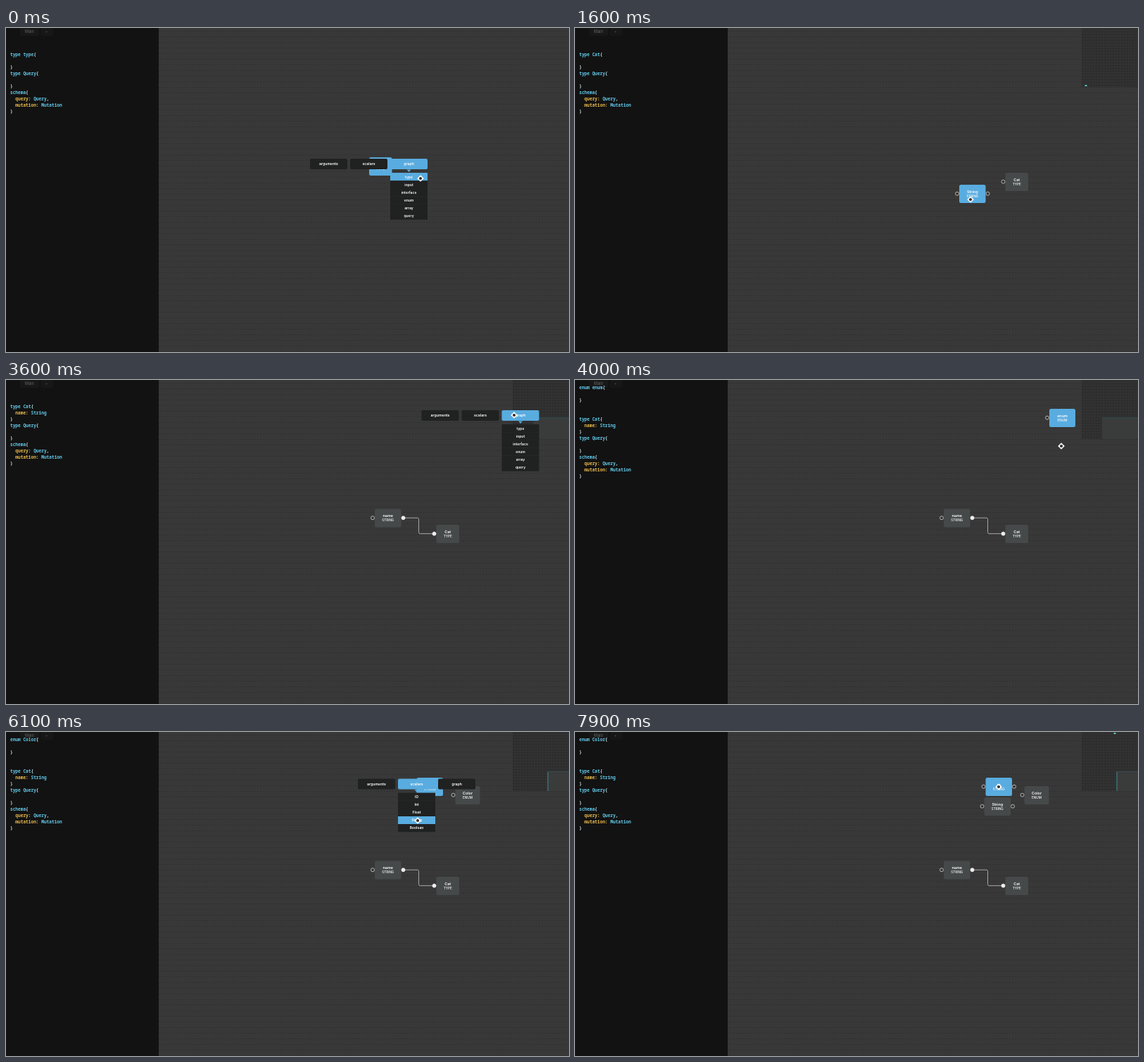
Recreate the animation shown at these times as an HTML page with a canvas. Size 800 by 461 pixels, loop 8 s.

```html
<!DOCTYPE html>
<html>
<head>
<meta charset="utf-8">
<style>
  html, body { margin: 0; width: 100%; height: 100%; overflow: hidden; background: #373737; }
  canvas { display: block; width: 800px; height: 461px; }
</style>
</head>
<body>
<canvas id="stage" width="800" height="461"></canvas>
<script>
const ctx = document.getElementById('stage').getContext('2d');
const LOOP = 8000, STEP = 100;
const BLUE = '#59acdf', CYAN = '#63c8e9', YELLOW = '#e9b94e', PALE = '#c8dde4', WHITE = '#fff';
const SANS = 'Inter, "Liberation Sans", sans-serif';
const MONO = '"Noto Sans Mono", "DejaVu Sans Mono", monospace';

// Each key is [time, x, y].
const CURSOR = [
  [100, 589, 214], [200, 535, 198], [300, 535, 198], [600, 630, 220], [900, 630, 220],
  [1000, 546, 223], [1200, 546, 234], [1400, 550, 285], [1600, 562, 244], [2200, 562, 244],
  [2300, 586, 236], [2600, 608, 218], [2700, 567, 241], [3000, 550, 218], [3200, 545, 201],
  [3500, 674, 41], [3600, 722, 50], [3800, 715, 102], [4000, 691, 94], [4200, 693, 60],
  [4600, 657, 95], [5400, 657, 95], [5500, 583, 64], [5600, 583, 64], [5700, 583, 76],
  [5900, 585, 126], [6300, 585, 126], [6500, 603, 81], [6600, 603, 81], [7000, 601, 109], [7200, 602, 78]
];
const CAT_PATH = [[300, 516, 184], [600, 611.5, 206]];
const NAME_PATH = [[2700, 546, 223], [3000, 529, 200.5], [3200, 524, 183.5]];
const COLOR_PATH = [[4200, 674, 41], [4600, 638.5, 77]];
const STRING_PATH = [[6600, 583.5, 65], [7000, 581.5, 93]];

const MENUS = [
  { from: 0, to: 200, x: 515.5, y: 193.5, tab: 2, opens: 0, item: 0, picks: 0 },
  { from: 1000, to: 1500, x: 546, y: 233, tab: 1, opens: 1200, item: 3, picks: 1400 },
  { from: 3500, to: 3900, x: 674, y: 50.5, tab: 2, opens: 3600, item: 3, picks: 3800 },
  { from: 5500, to: 6300, x: 583.5, y: 74, tab: 1, opens: 5700, item: 3, picks: 5900 }
];
const TABS = ['arguments', 'scalars', 'graph'];
const ITEMS = {
  1: ['ID', 'Int', 'Float', 'String', 'Boolean'],
  2: ['type', 'input', 'interface', 'enum', 'array', 'query']
};

const between = (t, a, b) => t >= a && t < b;

function along(keys, t) {
  const next = keys.findIndex(key => key[0] > t);
  if (next === 0) return keys[0].slice(1);
  if (next < 0) return keys[keys.length - 1].slice(1);
  const [t0, x0, y0] = keys[next - 1], [t1, x1, y1] = keys[next];
  const k = (t - t0) / (t1 - t0);
  return [x0 + (x1 - x0) * k, y0 + (y1 - y0) * k];
}

// Replaces `before` with `after`, one letter per step.
const typed = (t, start, before, after) =>
  t < start ? before : after.slice(0, Math.floor((t - start) / STEP) + 1);

function box(x, y, w, h, r, color) {
  ctx.fillStyle = color;
  ctx.beginPath();
  ctx.roundRect(x, y, w, h, r);
  ctx.fill();
}

function label(text, x, y, size, weight = 600, color = WHITE) {
  ctx.font = `${weight} ${size}px ${SANS}`;
  ctx.textAlign = 'center';
  ctx.fillStyle = color;
  ctx.fillText(text, x, y);
}

function port(x, y, linked) {
  ctx.beginPath();
  ctx.arc(x, y, 2.5, 0, 7);
  ctx.fillStyle = linked ? '#eee' : '#333';
  ctx.fill();
  ctx.strokeStyle = linked ? '#eee' : '#c4c4c4';
  ctx.lineWidth = 0.9;
  ctx.stroke();
}

function node([x, y], w, name, kind, { selected, output, linkIn, linkOut }) {
  const middle = y + 13;
  box(x, y, w, 26, 2.5, selected ? BLUE : '#464949');
  label(name, x + w / 2, middle - 3, 5.4);
  label(kind, x + w / 2, middle + 3.2, 4.6, 500);
  port(x - 3, middle - 0.3, linkIn);
  if (output) port(x + w + 3, middle - 0.3, linkOut);
}

function link(x0, y0, x1, y1) {
  const middle = (x0 + x1) / 2;
  ctx.beginPath();
  ctx.moveTo(x0, y0);
  ctx.arcTo(middle, y0, middle, y1, 2);
  ctx.arcTo(middle, y1, x1, y1, 2);
  ctx.lineTo(x1, y1);
  ctx.strokeStyle = '#a8a8a8';
  ctx.lineWidth = 1;
  ctx.stroke();
}

function menu(t, m) {
  const open = t >= m.opens;
  TABS.forEach((name, i) => {
    const x = m.x + (i - 1) * 57;
    const active = open && i === m.tab;
    box(x - 26.5, m.y - 7.5, 53, 15, 2, active ? BLUE : '#202121');
    label(name, x, m.y + 0.3, 5.2);
    if (!active) return;
    ctx.fillStyle = BLUE;
    ctx.beginPath();
    ctx.moveTo(x - 3, m.y + 8);
    ctx.lineTo(x + 3, m.y + 8);
    ctx.lineTo(x, m.y + 11.5);
    ctx.fill();
    ITEMS[i].forEach((item, row) => {
      const y = m.y + 18.2 + row * 11.1;
      box(x - 26.5, y - 5.6, 53, 11.2, 0, t >= m.picks && row === m.item ? BLUE : '#202121');
      label(item, x, y + 0.3, 5);
    });
  });
}

function pointer([x, y], dragging) {
  ctx.fillStyle = WHITE;
  ctx.beginPath();
  if (dragging) {
    ctx.arc(x, y, 1.3, 0, 7);
    ctx.fill();
    return;
  }
  const r = 4.8;
  ctx.moveTo(x, y - r);
  ctx.lineTo(x + r, y);
  ctx.lineTo(x, y + r);
  ctx.lineTo(x - r, y);
  ctx.fill();
  ctx.fillStyle = '#303030';
  ctx.beginPath();
  ctx.arc(x, y, 2.1, 0, 7);
  ctx.fill();
}

function dotRows(x, y, w, h, gapX, gapY, color) {
  ctx.fillStyle = color;
  for (let row = y; row < y + h; row += gapY)
    for (let col = x; col < x + w; col += gapX) ctx.fillRect(col, row, 2, 1);
}

function minimap(t) {
  if (t < 1000) return;
  box(720, 0, 80, 84, 0, '#313131');
  dotRows(720, 1, 80, 83, 4, 4, '#272727');
  if (t >= 3500) {
    const [x, y] = along([[4100, 749, 54], [4600, 770, 57.5]], t);
    const top = t < 6000 ? y : y - 1;
    box(x, top, 800 - x, 84 - top, 0, '#3a3b3b');
    ctx.fillStyle = t < 4100 ? '#315258' : '#3d8b94';
    if (t >= 4100) ctx.fillRect(x - 0.5, top, 1, 84 - top);
    if (t >= 6000) ctx.fillStyle = '#3b4c4e';
    ctx.fillRect(x, top - 0.5, 800 - x, 1);
  }
  const dot = t < 2300 ? [726, 82] : t < 3300 ? [726, 2]
    : between(t, 6400, 7000) ? [767, 6] : t >= 7000 ? [767, 2] : null;
  if (dot) box(dot[0] - 1.5, dot[1] - 1, 3, 2, 0, '#54c5bd');
}

function codeLine(row, ...parts) {
  ctx.font = `600 6.15px ${MONO}`;
  ctx.textAlign = 'left';
  let x = 6;
  for (const [text, color] of parts) {
    ctx.fillStyle = color;
    ctx.fillText(text, x, 11 + row * 9);
    x += ctx.measureText(text).width;
  }
}

function block(row, head, fields = []) {
  codeLine(row, [head, CYAN], ['{', PALE]);
  fields.forEach(([key, type, end = ''], i) =>
    codeLine(row + 1 + i, ['  ' + key + ':', YELLOW], [' ' + type, CYAN], [end, PALE]));
  codeLine(row + 1 + Math.max(1, fields.length), ['}', PALE]);
}

function editor(t, catName, colorName) {
  box(0, 0, 217, 461, 0, '#121212');
  box(20, -3, 27, 14, 2, '#181818');
  box(50, -3, 17, 14, 2, '#171717');
  label('Main', 33.5, 5, 5.6, 400, '#666');
  label('+', 57.5, 5.5, 5.6, 400, '#555');
  const hasEnum = t >= 3900;
  const first = hasEnum ? 5 : 3;
  if (hasEnum) block(0, 'enum ' + colorName);
  block(first, 'type ' + catName, t >= 2600 ? [['name', 'String']] : []);
  block(first + 3, 'type Query');
  block(first + 6, 'schema', [['query', 'Query', ','], ['mutation', 'Mutation']]);
}

function draw(t) {
  ctx.textBaseline = 'middle';
  box(0, 0, 800, 461, 0, '#383838');
  dotRows(217, 4, 583, 457, 4, 8, '#2f2f2f');
  const catName = typed(t, 500, 'type', 'Cat');
  const colorName = typed(t, 5000, 'enum', 'Color');
  editor(t, catName, colorName);
  minimap(t);

  const cursor = along(CURSOR, t);
  const cat = along(CAT_PATH, t), name = along(NAME_PATH, t);
  const linked = t >= 2600;
  if (linked) link(name[0] + 40.5, name[1] + 12.7, cat[0] - 3, cat[1] + 12.7);
  else if (t >= 2300) link(586.5, 235.7, ...cursor);

  node(cat, 32.5, catName, 'TYPE', { selected: t < 900, linkIn: linked });
  if (t >= 1500)
    node(name, 37.5, typed(t, 1900, 'String', 'name'), 'STRING',
      { selected: t < 3400, output: true, linkOut: linked });
  if (t >= 3900)
    node(along(COLOR_PATH, t), t < 5000 ? 37 : 35, colorName, 'ENUM', { selected: t < 5500 });
  if (t >= 6000)
    node([583.5, 65], 37.5, typed(t, 7800, 'String', 're'), 'STRING',
      { selected: t < 6200 || t >= 7200, output: true });
  if (t >= 6200)
    node(along(STRING_PATH, t), 37.5, 'String', 'STRING', { selected: t < 7200, output: true });

  MENUS.filter(m => between(t, m.from, m.to)).forEach(m => menu(t, m));
  const dragging = between(t, 300, 700) || between(t, 2700, 3300)
    || between(t, 4200, 4700) || between(t, 6600, 7100);
  pointer(cursor, dragging);
}

const start = performance.now();
function frame() {
  const t = (performance.now() - start) % LOOP;
  draw(Math.floor(t / STEP) * STEP);
  requestAnimationFrame(frame);
}
frame();
</script>
</body>
</html>
```
